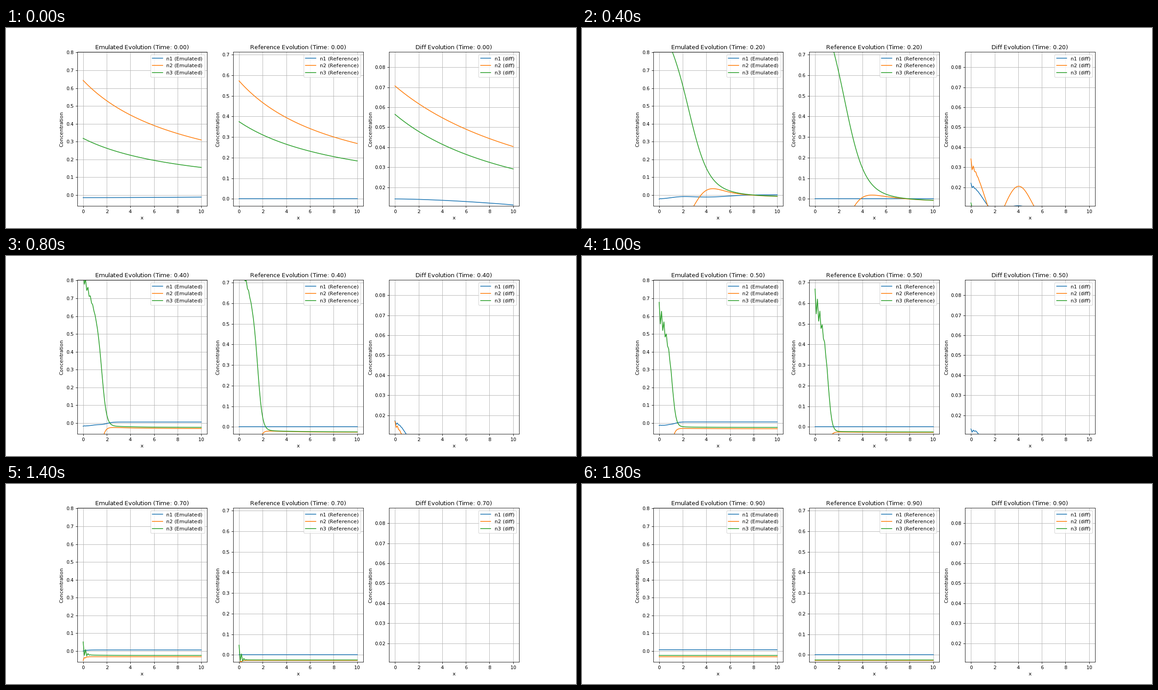
Write a matplotlib script that moves like this. It is 1262 px wide and 444 px high and loops after 2 s.

```python
import numpy as np
import matplotlib.pyplot as plt
from matplotlib.animation import FuncAnimation

W, H, DPI = 1262, 444, 80
STEPS, INTERVAL = 10, 200
KEY_TIMES = (.2, .3, .5, .7, .82)

x = np.linspace(0, 10, 100)
alt = 1 - 2 * (np.arange(x.size) % 2)


def key(t, *values):
    """Parameter eased linearly between the key times."""
    return np.interp(t, KEY_TIMES, values)


def fall(center, width):
    """Logistic front going from 1 on the left to 0 on the right."""
    return 1 / (1 + np.exp((x - center) / width))


def bump(center, width):
    return np.exp(-((x - center) / width) ** 2)


# Each state returns reference n2, n3 and the signed errors of n1, n2, n3.
def initial():
    n2 = .573 / (1 + .113 * x)
    n3 = .375 / (1 + .1033 * x)
    e1 = -.0142 + .000075 * x ** 1.6
    e2 = .0707 / (1 + .071 * x + .0004 * x ** 2)
    e3 = -.0565 / (1 + .088 * x + .00055 * x ** 2)
    return n2, n3, e1, e2, e3


def spreading():
    edge = np.exp(-x / 1.2) * np.cos(1.4 * x) + .07 * alt * np.exp(-8 * x)
    n2 = .0387 + .035 * bump(5.8, 5) + .047 * np.exp(-x / .8)
    n3 = .045 + 1.495 * fall(.63, 2.613)
    e1 = -(.0107 + .008 * bump(6, 3.16) + .00044 * (x - 6) + .0036 * edge)
    e2 = .0228 + .0165 * bump(5.8, 3.16) + .0001 * (x - 5.8) + .0069 * edge
    e3 = -(.0118 + .0095 * bump(5.5, 3.16) + .0058 * edge)
    return n2, n3, e1, e2, e3


def travelling(t):
    """Front that moves left, steepens and dies out at x = 0."""
    center = 3.5 - 4.68 * t - 42 * max(t - .6, 0) ** 2
    width = .14 + .66 * np.exp(-12 * (t - .2))
    height = .88 * np.exp(-((t - .32) / .319) ** 2) * (1 - 1.1 * (t - .2) * x)
    ripple = key(t, 0, .002, .05, .029, 0) * alt * bump(0, 1 / key(t, 1.6, 1.6, 1.6, 3.3, 3.3))

    tail = .25 * np.exp(-13.5 * (t - .2))
    far = -.0247 + tail * np.exp(-x / 2.6) + .2 * tail ** 2
    n3 = far + height * fall(center, width) + ripple

    depth = .18
    far2 = far - .0022 * min(2 * t, 1) ** 2
    dip = fall(center - .2 + .9 * width, .63 * width + .04)
    n2 = (far2 + depth) * (1 - dip) - depth - .145 * ripple

    crest = center - .5 + 2.45 * width
    jitter = alt * np.exp(-5 * x)
    e1 = (key(t, .0018, .0056, .0065, .0065, .0065)
          - key(t, .024, .027, .0187, .0105, 0)
          * fall(key(t, 1.1, 1.35, .7, 0, 0), key(t, .5, .4, .15, .2, .2))
          - key(t, .0125, .011, .011, 0, 0) * bump(crest, 3.2 * width)
          - key(t, .0012, .001, .001, .001, 0) * jitter)
    e2 = (key(t, 0, -.0042, -.0048, -.0048, -.0048)
          - key(t, .036, .022, .004, 0, 0)
          * fall(key(t, 1.05, .75, .3, 0, 0), key(t, .55, .42, .2, .1, .1))
          + .0207 * np.exp(-5.5 * (t - .2)) * bump(crest, 2 * width)
          - key(t, .0029, .003, 0, 0, 0) * jitter)
    e3 = .0005 + (key(t, -.0117, .002, .008, .004, 0) * np.exp(-x)
                  - key(t, .001, 0, 0, 0, 0) * jitter)
    return n2, n3, e1, e2, e3


def solve(t):
    if t < .05:
        return initial()
    if t < .15:
        return spreading()
    return travelling(t)


panels = [
    ("Emulated", "Emulated", (-.0611, .8029)),
    ("Reference", "Reference", (-.0345, .7131)),
    ("Diff", "diff", (.01066, .08766)),
]

plt.rcParams["text.hinting_factor"] = 1  # whole-pixel letter spacing
fig, axes = plt.subplots(1, 3, figsize=(W / DPI, H / DPI), dpi=DPI)
lines = []
for ax, (_, tag, ylim) in zip(axes, panels):
    lines.append([ax.plot(x, 0 * x, label=f"n{i} ({tag})")[0] for i in (1, 2, 3)])
    ax.set(xlim=(-.5, 10.5), ylim=ylim, xlabel="x", ylabel="Concentration")
    ax.grid(True)
    ax.legend(loc="upper right")


def update(step):
    t = step / STEPS
    n2, n3, *errors = solve(t)
    ref = np.array([0 * x, n2, n3])
    err = np.array(errors)
    for ax, (name, *_), group, curves in zip(axes, panels, lines, (ref + err, ref, abs(err))):
        ax.set_title(f"{name} Evolution (Time: {t:.2f})")
        for line, y in zip(group, curves):
            line.set_ydata(y)


anim = FuncAnimation(fig, update, frames=STEPS, interval=INTERVAL, repeat=True, repeat_delay=0)
plt.show()
```
